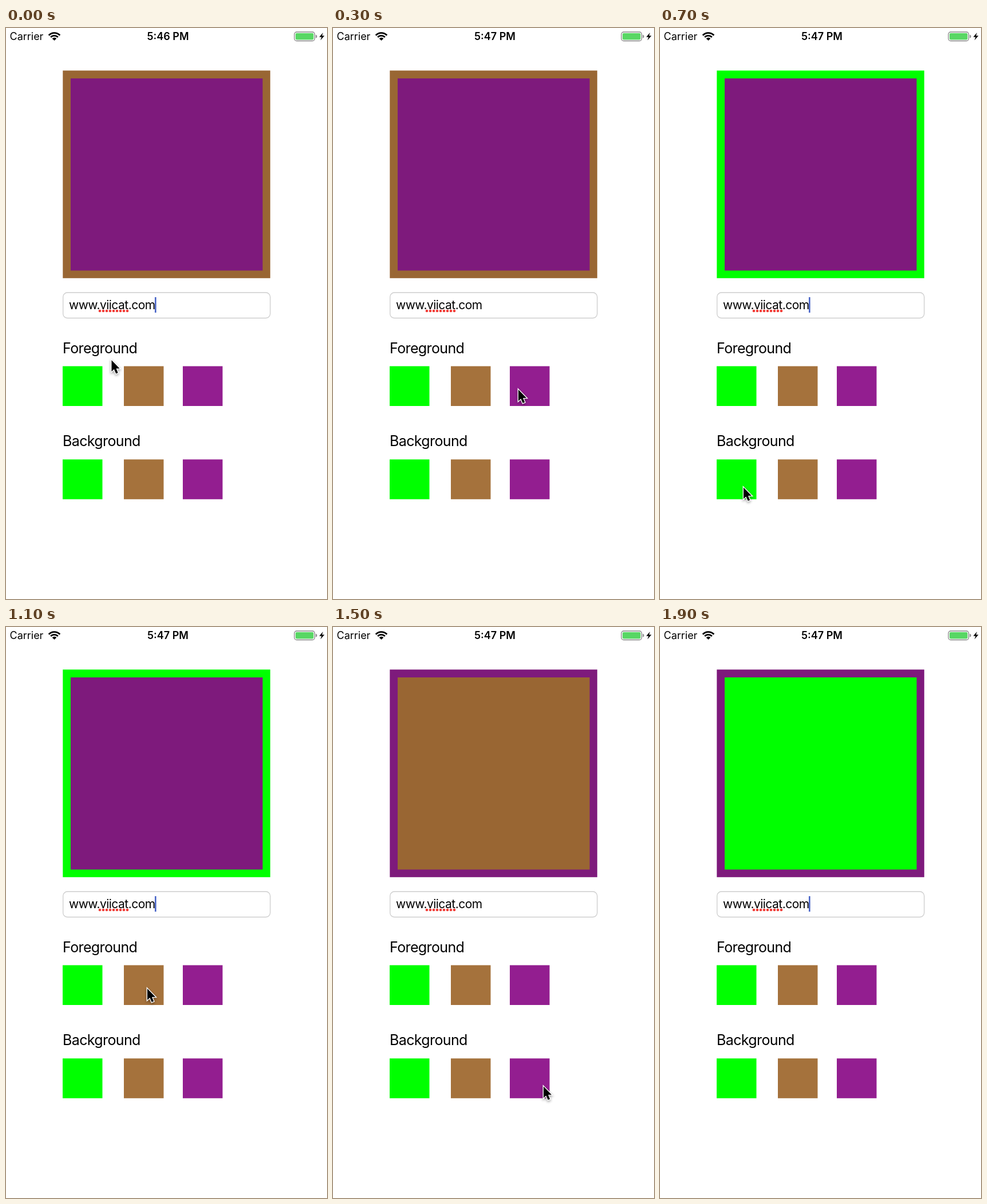
An HTML page with a canvas that plays this animation: 561x997 px, repeating every 2000 ms.

```html
<!DOCTYPE html>
<html lang="en">
<head>
<meta charset="utf-8">
<title>Colour picker</title>
<style>
  html, body { margin: 0; width: 100%; height: 100%; overflow: hidden; background: #fff; }
  canvas { display: block; width: 561px; height: 997px; }
</style>
</head>
<body>
<canvas id="stage" width="561" height="997"></canvas>
<script>
const ctx = document.getElementById('stage').getContext('2d');
const LOOP = 2000, STEP = 100, TRAVEL = 200;
const FONT = 'Inter, "Liberation Sans", sans-serif';
const TIGHT = -0.025;
const SIZE = 69.5;

const green = { x: 99, swatch: '#00ff00', ink: '#00ff00' };
const brown = { x: 206, swatch: '#a5723c', ink: '#996633' };
const purple = { x: 309, swatch: '#931e90', ink: '#7e1a7c' };
const fore = { label: 'Foreground', y: 590.5, reach: 40 };
const back = { label: 'Background', y: 753.3, reach: 48 };

// Each tap recolours its part one step later; dx is the tip's place on the swatch.
const taps = [
  { at: 100, part: fore, color: green, dx: 46 },
  { at: 200, part: fore, color: purple, dx: 15 },
  { at: 600, part: back, color: green, dx: 47 },
  { at: 1100, part: fore, color: brown, dx: 41 },
  { at: 1400, part: back, color: purple, dx: 59 },
  { at: 1700, part: fore, color: green, dx: 46 }
];
const START = { at: 0, x: 184.5, y: 579 };

const ease = k => k * k * (3 - 2 * k);
const mix = (a, b, k) => a + (b - a) * k;

function inkOf(part, initial, t) {
  const done = taps.filter(tap => tap.part === part && tap.at < t);
  return (done.length ? done.at(-1).color : initial).ink;
}

function pointerAt(t) {
  const stops = [START, ...taps.map(({ at, part, color, dx }) =>
    ({ at, x: color.x + dx, y: part.y + part.reach }))];
  const next = stops.findIndex(stop => stop.at > t);
  if (next < 0) return t > stops.at(-1).at ? null : stops.at(-1);
  const a = stops[next - 1], b = stops[next];
  const duration = Math.min(TRAVEL, b.at - a.at);
  const k = ease(Math.max(0, 1 - (b.at - t) / duration));
  return { x: mix(a.x, b.x, k), y: mix(a.y, b.y, k) };
}

// Blinks once a second, fading through grey around the dark phase.
function caretColor(t) {
  const fromDark = Math.abs((t + 100) % 1000 - 500);
  if (fromDark < 200) return null;
  return fromDark < 300 ? '#d0d0d0' : '#4a66c8';
}

function rect(x, y, w, h, color) {
  ctx.fillStyle = color;
  ctx.fillRect(x, y, w, h);
}

function roundRect(x, y, w, h, r) {
  ctx.beginPath();
  ctx.roundRect(x, y, w, h, r);
}

function polygon(points) {
  ctx.beginPath();
  points.forEach(([x, y]) => ctx.lineTo(x, y));
  ctx.closePath();
}

function text(str, x, y, size, { weight = 400, align = 'left', tracking = 0 } = {}) {
  ctx.font = `${weight} ${size}px ${FONT}`;
  ctx.letterSpacing = `${size * tracking}px`;
  ctx.textAlign = align;
  ctx.fillStyle = '#000';
  ctx.fillText(str, x, y);
}

function drawWifi(x, y) {
  const from = -Math.PI * 0.76, to = -Math.PI * 0.24;
  ctx.strokeStyle = ctx.fillStyle = '#000';
  ctx.lineWidth = 2.8;
  for (const r of [13.4, 8.7]) {
    ctx.beginPath();
    ctx.arc(x, y, r, from, to);
    ctx.stroke();
  }
  ctx.beginPath();
  ctx.moveTo(x, y);
  ctx.arc(x, y, 5.2, from, to);
  ctx.fill();
}

function drawBattery() {
  ctx.strokeStyle = ctx.fillStyle = '#858585';
  ctx.lineWidth = 1.3;
  roundRect(504, 7, 35.5, 15.5, 4);
  ctx.stroke();
  roundRect(541.3, 12, 2.2, 5.5, [0, 2, 2, 0]);
  ctx.fill();
  ctx.fillStyle = '#58d764';
  roundRect(506, 9, 31.5, 11.5, 2);
  ctx.fill();
  ctx.fillStyle = '#000';
  polygon([[554, 8], [547.5, 15.8], [551.5, 15.8], [549.5, 21.5], [556.5, 13.4], [552.3, 13.4]]);
  ctx.fill();
}

function drawField(caret) {
  ctx.strokeStyle = '#cdcdcd';
  ctx.lineWidth = 1.3;
  roundRect(99.7, 462, 362, 44.5, 7.5);
  ctx.stroke();
  text('www.viicat.com', 110, 491, 21, { tracking: TIGHT });
  ctx.fillStyle = '#f03a34';
  for (let i = 0; i < 9; i++) {
    ctx.beginPath();
    ctx.arc(164 + i * 6, 494, 2.3, 0, Math.PI * 2);
    ctx.fill();
  }
  if (caret) rect(260, 470, 2.6, 27, caret);
}

function drawPicker({ label, y }) {
  text(label, 99, y - 23, 25, { tracking: TIGHT });
  for (const { x, swatch } of [green, brown, purple]) rect(x, y, SIZE, SIZE, swatch);
}

function drawPointer({ x, y }) {
  ctx.save();
  ctx.translate(x, y + 1);
  ctx.scale(0.9, 0.9);
  polygon([[0, 0], [0, 22], [4.9, 17.6], [8.6, 26], [12.4, 24.4], [8.9, 16], [15.6, 16]]);
  ctx.lineWidth = 3;
  ctx.strokeStyle = '#fff';
  ctx.shadowColor = 'rgba(0,0,0,.4)';
  ctx.shadowBlur = 4;
  ctx.shadowOffsetY = 2;
  ctx.stroke();
  ctx.shadowColor = 'transparent';
  ctx.fillStyle = '#000';
  ctx.fill();
  ctx.restore();
}

function draw(t) {
  rect(0, 0, 561, 997, '#fff');
  text('Carrier', 6.5, 21, 18);
  drawWifi(84.5, 22);
  text(t < STEP ? '5:46 PM' : '5:47 PM', 283, 21, 18, { weight: 600, align: 'center' });
  drawBattery();

  rect(99.3, 74.3, 362.5, 362.5, inkOf(back, brown, t));
  rect(113, 88, 335.5, 335.5, inkOf(fore, purple, t));

  drawField(caretColor(t));
  drawPicker(fore);
  drawPicker(back);

  const tip = pointerAt(t);
  if (tip) drawPointer(tip);
}

const began = performance.now();
function tick() {
  const t = (performance.now() - began) % LOOP;
  draw(Math.floor(t / STEP) * STEP);
  requestAnimationFrame(tick);
}
tick();
</script>
</body>
</html>
```
